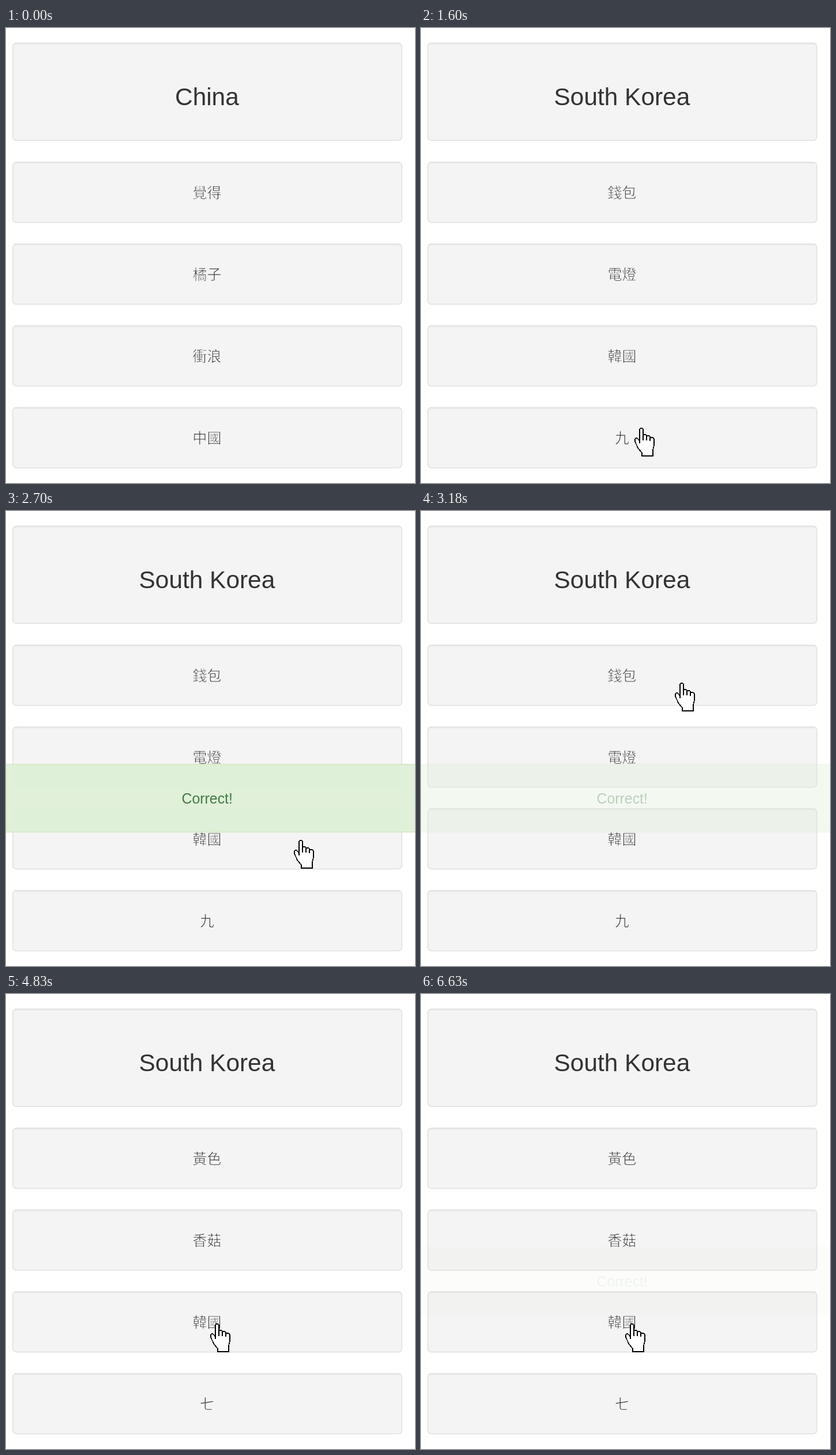
An HTML page for the animation above (7.03 s loop, 709x790 px).

```html
<!DOCTYPE html>
<html lang="en">
<head>
<meta charset="utf-8">
<title>Vocabulary quiz</title>
<style>
  html, body { margin: 0; width: 100%; height: 100%; overflow: hidden; background: #fff; }
  svg { display: block; width: 709px; height: 790px; }
  text { text-anchor: middle; fill: #333; font-family: "Liberation Sans", Arial, sans-serif; }
  .card { fill: #f4f4f4; stroke: #e3e3e3; stroke-width: 1.775; }
  .shade { stroke: #000; stroke-opacity: .045; stroke-width: 1.775; }
  .question { font-size: 42.4px; }
  /* The card-coloured stroke thins the glyphs */
  .option {
    font: 300 24.85px "Noto Sans CJK TC", "Noto Sans CJK JP", sans-serif;
    stroke: #f4f4f4; stroke-width: .75;
  }
  #banner rect { fill: #dff0d8; stroke: #d6e9c6; stroke-width: 1.775; }
  #banner text { font-size: 24.85px; fill: #3c763d; }
  #hand path { fill: #fff; stroke: #000; stroke-width: 1.6; shape-rendering: crispEdges; }
</style>
</head>
<body>
<svg viewBox="0 0 709 790">
  <g id="cards"></g>
  <g id="banner">
    <rect x="-12" y="439.9" width="740" height="117.5"/>
    <text x="348.7" y="508">Correct!</text>
  </g>
  <g id="hand">
    <path d="M9 24V4Q9 1 12 1T15 4V12H19Q21 12 21 14H25Q27 14 27 17H30Q34 17 34 21V31L32 38V49H13V44L6 35 1 24V20Q1 18 4 18 6 18 9 24Z"/>
    <path d="M9 23V27M15 12V22M21 14V22M27 17V23"/>
  </g>
</svg>
<script>
const LOOP = 7030;
const FADE = 1000;
const FADE_LEAD = 20;

const rounds = [
  { from: 0, question: "China", options: ["覺得", "橘子", "衝浪", "中國"] },
  { from: 1600, question: "South Korea", options: ["錢包", "電燈", "韓國", "九"] },
  { from: 4830, question: "South Korea", options: ["黃色", "香菇", "韓國", "七"] },
];

// Each move bends past "via" and begins where the previous one ended
const entry = [487, 727];
const moves = [
  { start: 590, end: 890, via: [420, 705], to: [370, 694] },
  { start: 1850, end: 2240, via: [378, 702], to: [386, 711] },
  { start: 2240, end: 3110, via: [582, 676], to: [440, 298] },
  { start: 3400, end: 4040, via: [363, 375], to: [354, 572] },
];

// The picture stands still during these spans
const holds = [[4830, 5060], [5680, 6080], [6630, LOOP]];

const byId = id => document.getElementById(id);
const cards = byId("cards"), banner = byId("banner"), hand = byId("hand");
const clamp01 = p => Math.min(1, Math.max(0, p));
const swing = p => (1 - Math.cos(Math.PI * p)) / 2;

function addCard(top, height, kind, baseline) {
  cards.insertAdjacentHTML("beforeend", `
    <rect class="card" x="11.9" y="${top + .9}" width="674.2" height="${height - 1.8}" rx="6.2"/>
    <path class="shade" d="M15 ${top + 2.6}H683"/>
    <text class="${kind}" x="348.4" y="${baseline}"></text>`);
  return cards.lastElementChild;
}

const question = addCard(25.3, 170.8, "question", 134);
const options = [0, 1, 2, 3].map(i => addCard(232 + 142 * i, 106.5, "option", 294.7 + 142 * i));

function pointerAt(time) {
  let position = entry;
  for (const { start, end, via, to } of moves) {
    if (time < start) break;
    const p = swing(clamp01((time - start) / (end - start))), q = 1 - p;
    position = position.map((from, i) => q * q * from + 2 * p * q * via[i] + p * p * to[i]);
  }
  return position.map(Math.round);
}

function showRound(round) {
  question.textContent = round.question;
  options.forEach((option, i) => option.textContent = round.options[i]);
}

let shownRound;
function draw(loopTime) {
  const hold = holds.find(([start, end]) => loopTime >= start && loopTime < end);
  const time = hold ? hold[0] : loopTime;

  const round = rounds.findLast(({ from }) => from <= time);
  if (round !== shownRound) showRound(shownRound = round);

  // Every answered round fades the banner in and straight out again
  const phase = (time - round.from + FADE_LEAD) / FADE;
  banner.setAttribute("opacity", round === rounds[0] || phase > 2 ? 0 : swing(phase));

  hand.setAttribute("visibility", time < moves[0].start ? "hidden" : "visible");
  hand.setAttribute("transform", `translate(${pointerAt(time)})`);
}

let begin;
function loop(now) {
  begin ??= now;
  draw((now - begin) % LOOP);
  requestAnimationFrame(loop);
}
draw(0);
requestAnimationFrame(loop);
</script>
</body>
</html>
```
